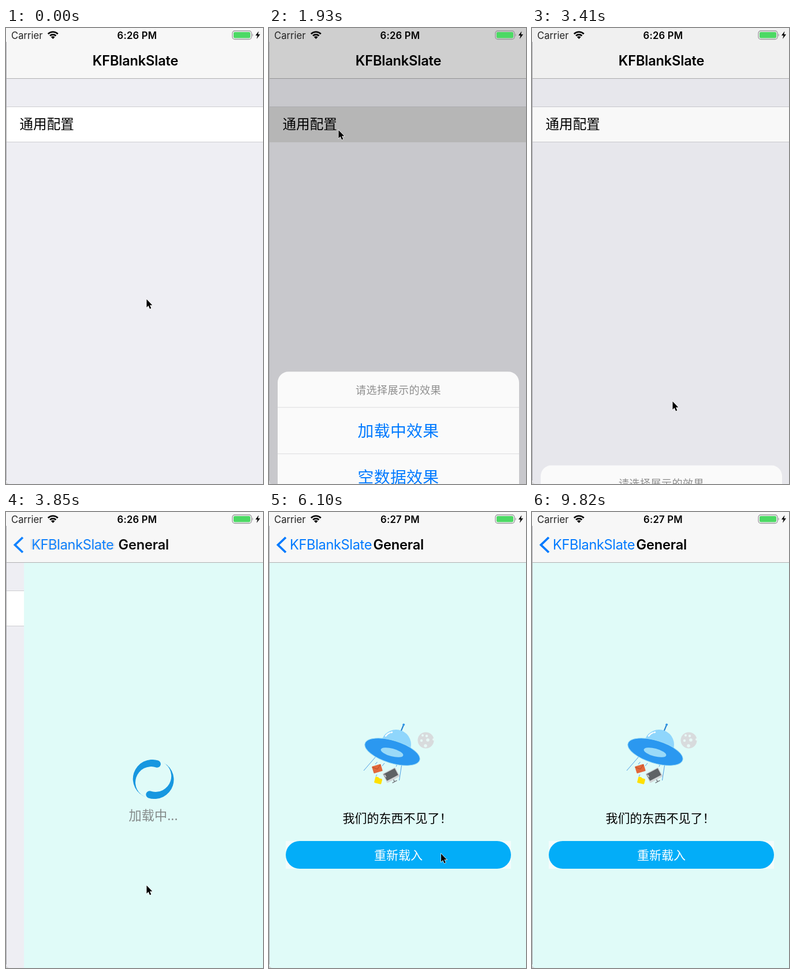
Write an HTML page that moves like this. It is 445 by 790 pixels and loops after 9.92 s.

```html
<!DOCTYPE html>
<html lang="zh-CN">
<head>
<meta charset="utf-8">
<title>KFBlankSlate</title>
<style>
  html, body { margin: 0; width: 100%; height: 100%; overflow: hidden; background: #eeeef3; }
  svg { position: fixed; inset: 0; width: 100%; height: 100%; display: block; }
  text { font-family: Inter, Roboto, sans-serif; }
  .zh { font-family: "Noto Sans CJK SC", "Noto Sans CJK", "Noto Sans", sans-serif; }
  .mid { text-anchor: middle; }
  .bar { font-size: 23.6px; letter-spacing: -.2px; }
  .bold { font-weight: 600; }
  .status { font-size: 16.7px; }
  .option { font-size: 27.8px; letter-spacing: .4px; fill: #007aff; }
  .blue { fill: #007aff; }
</style>
</head>
<body>
<svg viewBox="0 0 445 790" preserveAspectRatio="none">
  <defs>
    <clipPath id="card"><rect x="15" y="303" width="418" height="382" rx="19"/></clipPath>
    <path id="swoosh" d="M-2-33.5A33.5 33.5 0 0 0-2 33.5A27.2 27.2 0 0 1-2-21A6.2 6.2 0 0 0-2-33.5Z"/>
  </defs>

  <g id="list">
    <rect width="445" height="790" fill="#eeeef3"/>
    <rect y="136" width="445" height="62" fill="#cdcdd1"/>
    <rect y="137" width="445" height="60" fill="#fff"/>
    <rect id="pressed" y="137" width="445" height="61" fill="#d9d9d9"/>
    <text class="zh" x="23.5" y="175" font-size="23.6">通用配置</text>
  </g>

  <g id="detail">
    <rect width="445" height="790" fill="#e0fbf8"/>
    <g id="loading">
      <g id="spinner" fill="#1797e0">
        <use href="#swoosh"/>
        <use href="#swoosh" transform="rotate(180)"/>
      </g>
      <text class="zh mid" x="224" y="533.5" font-size="22.2" fill="#858a8a">加载中...</text>
    </g>
    <g id="failed">
      <g id="moon">
        <circle cx="271.5" cy="395.5" r="14" fill="#d8dbdd"/>
        <g fill="#e6f8f6">
          <circle cx="266" cy="387" r="2"/>
          <circle cx="273" cy="388" r="2.2"/>
          <circle cx="264" cy="396" r="2.2"/>
          <circle cx="275" cy="395" r="2.8"/>
          <circle cx="271" cy="405" r="2.8"/>
          <circle cx="285" cy="394" r="2"/>
        </g>
      </g>
      <g id="ufo">
        <g stroke="#4b9ee4" fill="none">
          <path d="M190 418L164 448M230 436L225.500 465"/>
          <path d="M184 437L187.500 433M196 440L200 435M220 441L222 437M185 458L187 455"/>
        </g>
        <path d="M228 381L233 369" stroke="#2380cf" stroke-width="2"/>
        <circle cx="233.200" cy="368.300" r="1.900" fill="#2f95e6"/>
        <circle cx="220" cy="403" r="26" fill="#8fd6fc"/>
        <path d="M202 388Q205 384 209 382.500M211.500 382L213 381.500" stroke="#fff" stroke-width="2.400" stroke-linecap="round" fill="none"/>
        <ellipse cx="213.500" cy="415.500" rx="49.500" ry="19.500" transform="rotate(17 213.500 415.500)" fill="#2b98f0" stroke="#9bdcf6"/>
        <ellipse cx="213" cy="416.500" rx="20" ry="6.800" transform="rotate(15 213 416.500)" fill="#9adaf8"/>
      </g>
      <g transform="rotate(-17 187.500 445)">
        <rect x="179.500" y="438.500" width="16" height="12.500" rx="1" fill="#e2683b"/>
        <path d="M180 439.500L187.500 445.500L195 439.500" stroke="#b84f2a" fill="none"/>
      </g>
      <path transform="rotate(14 189 465)" d="M183 461Q183 459.500 184.500 459.500H188L190 461H194Q195.500 461 195.500 462.500V469Q195.500 470.500 194 470.500H184.500Q183 470.500 183 469Z" fill="#ffe000"/>
      <g transform="rotate(-28 211 456)">
        <rect x="199" y="447" width="25" height="18" rx="1.500" fill="#d3d6d8"/>
        <rect x="200.500" y="448.500" width="22" height="13" fill="#5f6366"/>
        <path d="M202 450V455" stroke="#fff" stroke-width="1.200"/>
        <path d="M211.500 465V468.500M207 469H216" stroke="#777c80" stroke-width="1.500"/>
      </g>
      <text class="zh" x="127.500" y="538" font-size="21">我们的东西不见了！</text>
      <rect x="29" y="570" width="390" height="48" fill="#f3fcfb"/>
      <rect x="29" y="570" width="390" height="48" rx="24" fill="#03adf8"/>
      <text class="zh mid" x="224" y="602.300" font-size="21" fill="#fff">重新载入</text>
    </g>
  </g>

  <g id="nav">
    <rect width="445" height="88" fill="#f7f7f7"/>
    <rect y="87" width="445" height="1" fill="#b0b0b2"/>
    <text id="title" class="bar bold mid" x="224" y="65">KFBlankSlate</text>
    <path id="chevron" d="M29 44L15.500 57L29 70" fill="none" stroke="#007aff" stroke-width="3.800"/>
    <text id="back" class="bar blue" x="36" y="65" style="letter-spacing:-.36px">KFBlankSlate</text>
    <text id="general" class="bar bold mid" x="224.300" y="65">General</text>
  </g>

  <rect id="dim" width="445" height="790"/>

  <g id="status">
    <text class="status" x="9" y="18.500" fill="#222">Carrier</text>
    <g fill="none" stroke="#000" stroke-width="2.700">
      <path d="M72.800 10.200A12.200 12.200 0 0 1 89.800 10.200M76.100 13.500A7.500 7.500 0 0 1 86.500 13.500"/>
    </g>
    <path d="M81.300 19L78 15.700A4.700 4.700 0 0 1 84.600 15.700Z"/>
    <text id="clock" class="status bold mid" x="227" y="18.500" style="letter-spacing:.2px"></text>
    <rect x="392" y="5" width="33" height="14.500" rx="4" fill="none" stroke="#98989a" stroke-width="1.300"/>
    <rect x="394" y="7" width="29" height="10.500" rx="2" fill="#4cd964"/>
    <path d="M426.500 9.500Q429 12.200 426.500 15Z" fill="#98989a"/>
    <path d="M437.500 5.500L432 13H435.500L434 19L440 11H436.300Z"/>
  </g>

  <g id="sheet">
    <g clip-path="url(#card)">
      <rect x="15" y="303" width="418" height="382" fill="#fafafa"/>
      <rect id="picked" x="15" y="606" width="418" height="79" fill="#e3e3e4"/>
      <path d="M15 365H433M15 445.500H433M15 525.500H433M15 605.500H433" stroke="#dcdcde"/>
    </g>
    <text class="zh mid" x="224" y="341.800" font-size="18.100" fill="#8f8f8f" letter-spacing=".4">请选择展示的效果</text>
    <text class="zh mid option" x="224" y="415.500">加载中效果</text>
    <text class="zh mid option" x="224" y="495.500">空数据效果</text>
    <text class="zh mid option" x="224" y="575.500">加载成功效果</text>
    <text class="zh mid option" x="224" y="655.500">加载失败效果</text>
    <rect x="15" y="697" width="418" height="79" rx="19" fill="#fafafa"/>
    <text class="zh mid option bold" x="224" y="747">取消</text>
  </g>

  <path d="M0 783Q1 790 6 790H0Z" fill="#d4d4d6"/>
  <path d="M.5 24V784" stroke="#a9a9ad"/>

  <path id="cursor" d="M0 0V14L3.200 11L5.500 16.400L7.800 15.400L5.500 10.300H9.800Z" stroke="#fff" stroke-width="1.200" paint-order="stroke"/>
</svg>

<script>
const LOOP = 9920, STEP = 148.6, LEAD = 14;
const W = 445, SHEET_TRAVEL = 487;

// Each row: step, value(s)
const CURSOR = [
  [0, 243.5, 470], [1, 240, 455], [2, 222, 400], [3, 190, 315], [4, 150, 235], [5, 126, 190], [6, 120.5, 177],
  [13, 120.5, 177], [14, 160, 300], [15, 222, 470], [16, 245.5, 558], [17, 246, 610], [18, 244, 640], [19, 243.5, 647],
  [27, 243.5, 647], [29, 262, 625], [31, 304, 580.5],
  [34, 304, 580.5], [35, 308, 592], [37, 326, 655], [38, 323, 650], [41, 298, 592],
  [43, 298, 592], [45, 302, 620], [48, 315.5, 679],
  [52, 315.5, 679], [53, 320, 684], [58, 414, 775]
];
const SHEET = [[12, 0], [13, .4], [14, .86], [15, .98], [16, 1], [21, 1], [22, .5], [23, .934 / 14], [24, 0]];
const PUSH = [[24, 0], [25, .55], [26, .93], [27, 1]];
const PRESS = [[11, 0], [12, 1], [13, 1], [15, 0]];

const el = id => document.getElementById(id);
const lerp = (a, b, k) => a + (b - a) * k;
const move = (id, x, y = 0) => el(id).setAttribute("transform", `translate(${x} ${y})`);
const fade = (id, v) => el(id).setAttribute("opacity", v);
const show = (id, on) => el(id).setAttribute("display", on ? "inline" : "none");

function sample(rows, n) {
  const i = rows.findIndex(r => r[0] >= n);
  if (i < 0) return rows[rows.length - 1].slice(1);
  if (i === 0) return rows[0].slice(1);
  const a = rows[i - 1], b = rows[i], k = (n - a[0]) / (b[0] - a[0]);
  return a.slice(1).map((v, j) => lerp(v, b[j + 1], k));
}

function draw(n) {
  const [up] = sample(SHEET, n), [push] = sample(PUSH, n), [press] = sample(PRESS, n);
  const rest = 1 - push;

  move("list", -.3 * W * push);
  fade("pressed", press);
  show("detail", push > 0);
  move("detail", W * rest);

  const failed = (n >= 31 && n < 43) || n >= 50;
  show("failed", failed);
  show("loading", !failed);
  el("spinner").setAttribute("transform", `translate(224 463) rotate(${(n - 49) * 54})`);

  fade("title", rest);
  move("title", -117 * push);
  fade("back", push);
  move("back", 117 * rest);
  fade("chevron", push);
  fade("general", push);
  move("general", 200 * rest);
  el("clock").textContent = n < 30 ? "6:26 PM" : "6:27 PM";

  fade("dim", .4 * up);
  show("sheet", up > 0);
  show("picked", n === 21);
  move("sheet", 0, SHEET_TRAVEL * (1 - up));

  show("cursor", n < 59);
  move("cursor", ...sample(CURSOR, n));
}

let last = -1;
const start = performance.now();
function tick() {
  const t = (performance.now() - start) % LOOP;
  const n = Math.min(66, Math.floor((t + LEAD) / STEP));
  if (n !== last) draw(last = n);
  requestAnimationFrame(tick);
}
tick();
</script>
</body>
</html>
```
